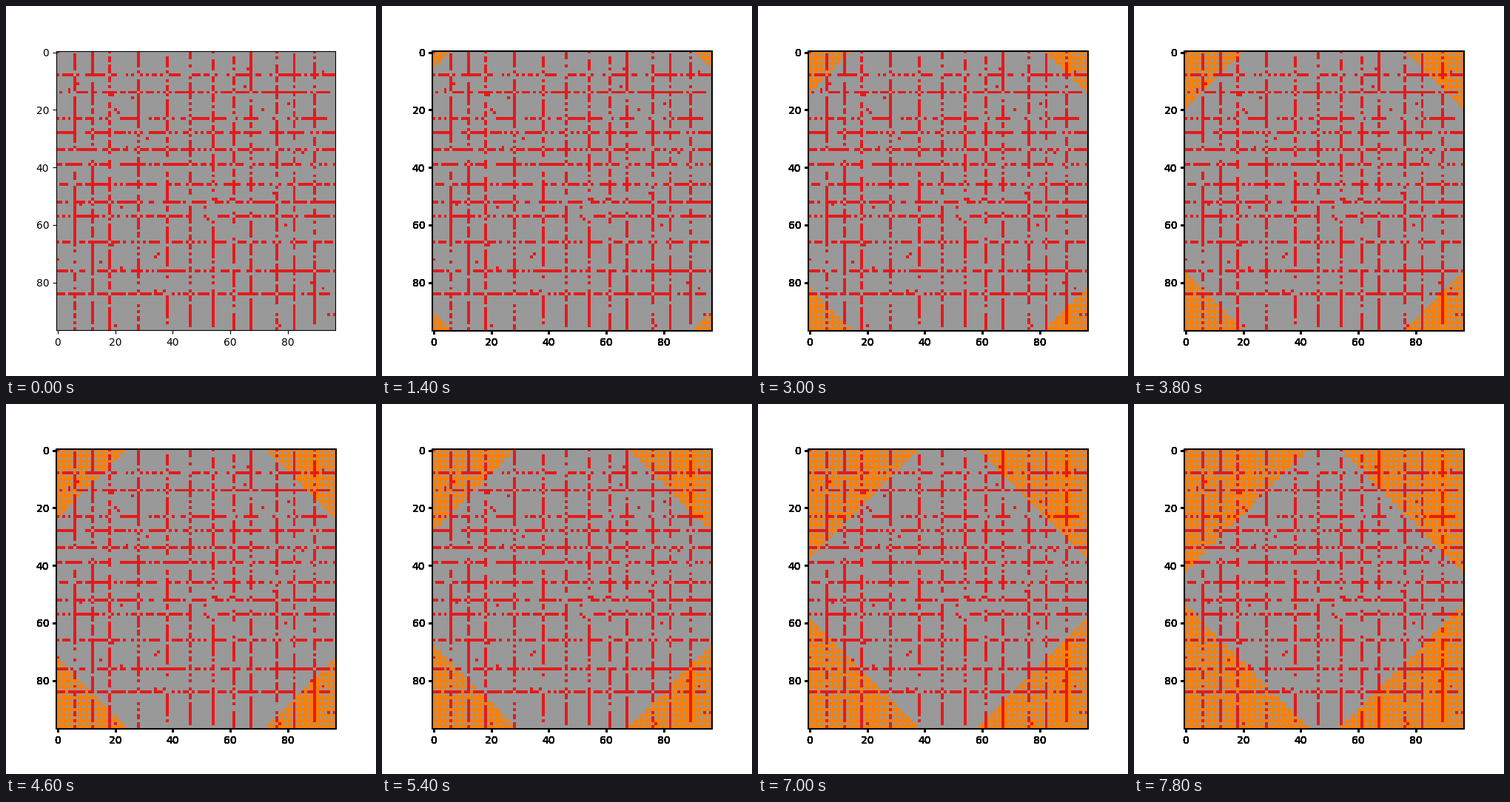
Write a matplotlib script that moves like this. It is 500x500 px and loops after 8000 ms.

```python
import numpy as np
import matplotlib.pyplot as plt
from matplotlib.animation import FuncAnimation
from matplotlib.colors import ListedColormap

N = 97
SIZE = 500
FRAMES, INTERVAL = 40, 200
GROUND, ROAD, FIRE = range(3)
COLORS = ListedColormap(["#999999", "#e41a1c", "#ff7f00"])

ROWS = [8, 14, 23, 28, 34, 39, 46, 52, 57, 66, 76, 84]
COLS = [6, 12, 18, 28, 38, 46, 54, 61, 67, 76, 82, 89]
ROAD_DENSITY = 0.72
CROSSING_DENSITY = 0.4
STRAYS = 45


def build_map():
    """Dashed roads on a grid, with some stray cells between them."""
    rng = np.random.default_rng(12)
    grid = np.full((N, N), GROUND)
    for r in ROWS:
        grid[r, rng.random(N) < ROAD_DENSITY] = ROAD
    for c in COLS:
        grid[rng.random(N) < ROAD_DENSITY, c] = ROAD
    filled = rng.random((len(ROWS), len(COLS))) < CROSSING_DENSITY
    grid[np.ix_(ROWS, COLS)] = np.where(filled, ROAD, GROUND)
    grid[tuple(rng.integers(0, N, (2, STRAYS)))] = ROAD
    return grid


BASE = build_map()
Y, X = np.mgrid[:N, :N]
CORNER_DIST = np.minimum(X, N - 1 - X) + np.minimum(Y, N - 1 - Y)
HOLES = (X % 2 == 1) & (Y % 2 == 1)
BURNABLE = (BASE == GROUND) & ~HOLES


def state(i):
    reach = 1.13 * i - 2
    return np.where(BURNABLE & (CORNER_DIST <= reach), FIRE, BASE)


fig = plt.figure(figsize=(SIZE / 100, SIZE / 100), dpi=100, facecolor="white")
RECT = [v / SIZE for v in (67.9, 62.2, 377.1, 377.1)]


def make_axes(label, zorder):
    ax = fig.add_axes(RECT, label=label, zorder=zorder)
    ax.patch.set_visible(False)
    ax.set(xlim=(-0.5, N - 0.5), ylim=(N - 0.5, -0.5))
    return ax


def make_heavy(k, width=3 * 72 / 100):
    ax = make_axes(f"heavy{k}", 0)
    ax.tick_params(width=width)
    for spine in ax.spines.values():
        spine.set_linewidth(width)
    return ax


# Overprinted axes make the frame and labels heavier after the start
heavy = [make_heavy(k) for k in range(10)]

main = make_axes("main", 1)
image = main.imshow(BASE, cmap=COLORS, vmin=GROUND, vmax=FIRE,
                    interpolation="nearest", aspect="auto")


def update(i):
    image.set_data(state(i))
    for ax in heavy:
        ax.set_visible(i > 0)
    return [image]


anim = FuncAnimation(fig, update, frames=FRAMES, interval=INTERVAL,
                     repeat=True, blit=False)
plt.show()
```
